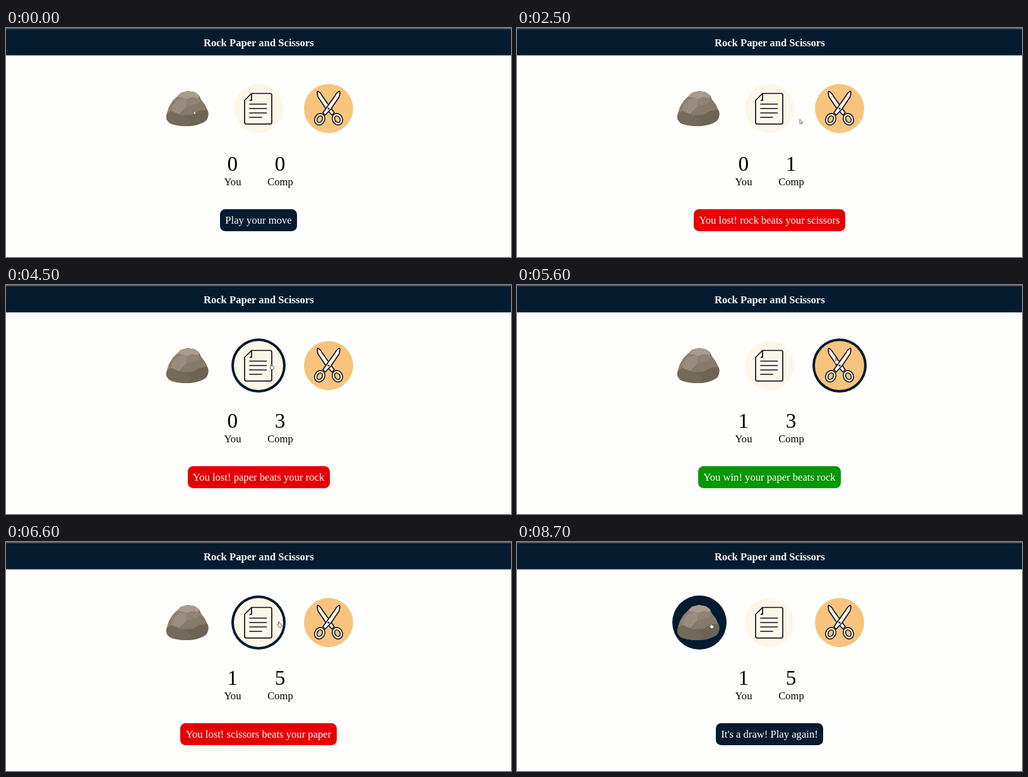
Animation, 800 px wide and 364 px high, one loop 9000 ms. Source, as an HTML page:

```html
<!DOCTYPE html>
<html lang="en">
<head>
<meta charset="utf-8">
<title>Rock Paper and Scissors</title>
<style>
  html, body { margin: 0; width: 100%; height: 100%; overflow: hidden; background: #fefefc; }
  #stage {
    position: relative; width: 800px; height: 364px; overflow: hidden;
    font: 16.64px/19px "Liberation Serif", "Times New Roman", serif;
  }
  svg { position: absolute; inset: 0; }
  text { text-anchor: middle; }
  .score { font-size: 33.28px; }
  .ring { fill: #051b2f; visibility: hidden; }
  #row { position: absolute; top: 287.5px; width: 800px; display: flex; justify-content: center; }
  #msg { padding: 8.2px 8.3px; border-radius: 8.3px; color: #fff; white-space: nowrap; }
  .ink { fill: none; stroke: #0c1122; stroke-width: 1.7; stroke-linecap: round; stroke-linejoin: round; }
  .cursor { fill: #fff; stroke: #333; stroke-width: .7; stroke-linejoin: round; }
</style>
</head>
<body>
<div id="stage">
  <svg width="800" height="364" viewBox="0 0 800 364">
    <rect width="800" height="43.5" fill="#051b2f"/>
    <rect width="800" height="2" fill="#55565e"/>
    <text x="400.3" y="28.5" fill="#fff" font-weight="bold">Rock Paper and Scissors</text>

    <g id="rock">
      <circle class="ring" cx="289" cy="128" r="43"/>
      <path fill="#7b7162" d="M254 139L258 126 264 116 271 109 277 103 288 100 299 102 306 107 309 114 315 122 320 132Q322 142 316 148 306 155 288 156 268 156 259 151 253 146 254 139Z"/>
      <path fill="#8b8071" d="M264 116L271 109 281 111 272 114 263 124 262 132 255 136 258 126Z"/>
      <path fill="#a99c8d" d="M271 109L277 103 288 100 299 102 306 107 305 112 295 110 287 113 281 111Z"/>
      <path fill="#998d7e" d="M263 124L272 114 281 111 287 113 286 125 274 137 262 132Z"/>
      <path fill="#8f8374" d="M287 113L295 110 305 112 309 114 303 121 294 123 286 125Z"/>
      <path fill="#867a6b" d="M286 125L294 123 303 121 309 114 315 122 318 130 306 132 296 138 280 139 274 137Z"/>
      <path fill="#6e6455" d="M280 139L296 138 306 132 318 130 320 132Q322 142 316 148 306 155 288 156L294 148Z"/>
      <path fill="#746a5b" d="M255 136L262 132 274 137 280 139 294 148 288 156Q268 156 259 151 253 146 254 139Z"/>
    </g>

    <g id="paper">
      <circle class="ring" cx="400" cy="128" r="43"/>
      <circle cx="400" cy="128" r="39" fill="#fdf7e9"/>
      <path class="ink" d="M389 104H418.500Q421 104 421 106.500V150Q421 152.700 418.500 152.700H380.500Q378 152.700 378 150V115ZV115H386.500Q389 115 389 112.500V104M386 121H412.500M386 128H412.500M386 135H412.500M386 142H405"/>
    </g>

    <g id="scissors">
      <circle class="ring" cx="511" cy="128" r="43"/>
      <circle cx="511" cy="128" r="39" fill="#f8c47d"/>
      <g id="half">
        <ellipse cx="525" cy="145" rx="6" ry="7.500" transform="rotate(-28 525 145)" fill="none" stroke="#111522" stroke-width="5.400"/>
        <path d="M493.500 100.500Q498 102 501 108L514.500 127 520 134.500 516.500 138.500 507 128.500 494.500 110Q492.500 105 493.500 100.500Z" fill="#fdf7e9" stroke="#111522" stroke-width="1.700" stroke-linejoin="round"/>
        <ellipse cx="525" cy="145" rx="6" ry="7.500" transform="rotate(-28 525 145)" fill="none" stroke="#fdf7e9" stroke-width="2.300"/>
      </g>
      <use href="#half" transform="matrix(-1 0 0 1 1022 0)"/>
      <circle cx="511" cy="128" r="1.600" fill="#111522"/>
    </g>

    <text id="you" class="score" x="358.700" y="226.500">0</text>
    <text id="comp" class="score" x="434" y="226.500">0</text>
    <text x="359" y="250">You</text>
    <text x="434.500" y="250">Comp</text>
  </svg>

  <div id="row"><div id="msg"></div></div>

  <svg width="800" height="364" viewBox="0 0 800 364">
    <g id="pointer" class="cursor">
      <path id="arrow" d="M0 0V6.800L1.500 5.500 2.600 7.800 3.700 7.300 2.700 5.100H4.700Z"/>
      <path id="hand" d="M1.500 5.500V.8Q2.200-.3 2.900.8V3.700L6 4.500Q6.800 5 6.500 7L5.700 9.500H2.300L0 6.400Q.1 5 1.500 5.500Z"/>
    </g>
  </svg>
</div>

<script>
const $ = id => document.getElementById(id);
const LOOP = 9000;
const NAVY = '#051b2f', RED = '#e60000', GREEN = '#079607';

// time, x, y, hovered choice
const moves = [
  [0, 297, 131], [200, 430, 19], [300, 452, 112], [400, 396, 214], [500, 405, 315], [600, 734, 167],
  [1300, 514, 134, 'scissors'], [2300, 492, 140, 'scissors'], [2400, 458, 147], [2500, 448, 145],
  [2800, 435, 138, 'paper'], [2900, 424, 133, 'paper'],
  [3700, 345, 138], [3800, 318, 136, 'rock'], [4100, 318, 162],
  [4500, 418, 125, 'paper'], [5000, 482, 124, 'scissors'], [5600, 503, 116, 'scissors'],
  [6100, 455, 138], [6400, 435, 130, 'paper'], [6600, 430, 126, 'paper'],
  [7000, 392, 132, 'paper'], [7100, 347, 134], [7300, 340, 131],
  [7600, 323, 129, 'rock'], [7700, 315, 127, 'rock'], [8600, 310, 128, 'rock'], [8700, 305, 128, 'rock']
];

// time, you, comp, message, colour
const rounds = [
  [0, 0, 0, 'Play your move', NAVY],
  [1700, 0, 1, 'You lost! rock beats your scissors', RED],
  [3400, 0, 2, 'You lost! scissors beats your paper', RED],
  [3900, 0, 3, 'You lost! paper beats your rock', RED],
  [4900, 1, 3, 'You win! your paper beats rock', GREEN],
  [5900, 1, 4, 'You lost! rock beats your scissors', RED],
  [6600, 1, 5, 'You lost! scissors beats your paper', RED],
  [8200, 1, 5, "It's a draw! Play again!", NAVY]
];

const at = (steps, t) => steps.findLast(s => s[0] <= t);
const show = (el, on) => { el.style.visibility = on ? 'visible' : 'hidden'; };

function draw(t) {
  const [, x, y, hover] = at(moves, t);
  const [, you, comp, text, colour] = at(rounds, t);
  for (const id of ['rock', 'paper', 'scissors']) show($(id).querySelector('.ring'), id === hover);
  $('pointer').setAttribute('transform', `translate(${x} ${y})`);
  show($('hand'), hover);
  show($('arrow'), !hover);
  $('you').textContent = you;
  $('comp').textContent = comp;
  $('msg').textContent = text;
  $('msg').style.background = colour;
}

const start = performance.now();
function tick() {
  draw((performance.now() - start) % LOOP);
  requestAnimationFrame(tick);
}
tick();
</script>
</body>
</html>
```
